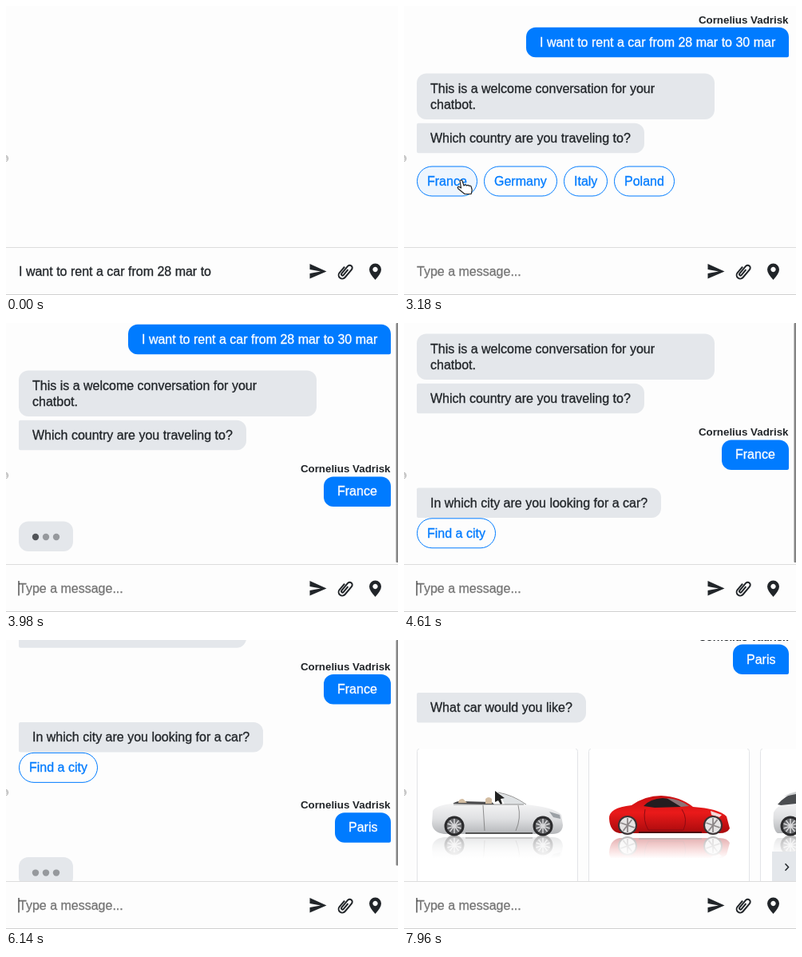
An HTML page that plays this animation: 491x362 px, repeating every 8000 ms.

```html
<!DOCTYPE html>
<html lang="en">
<head>
<meta charset="utf-8">
<title>Car rental chat</title>
<style>
  html, body { margin: 0; width: 100%; height: 100%; overflow: hidden; background: #fdfdfd; }
  svg { display: block; width: 491px; height: 362px; }
  text {
    font: 16px "Liberation Sans", Arial, sans-serif; white-space: pre;
    color: #212529; fill: currentColor; stroke: currentColor; stroke-width: .3px;
  }
  .name { font-weight: bold; font-size: 13.33px; text-anchor: end; stroke: none; }
  .light { color: #fff; }
  .link { color: #007bff; }
  .bot { fill: #e4e7eb; }
  .user { fill: #007bff; }
  .pill { fill: #fdfdfd; stroke: #007bff; }
  .icon { fill: #212529; }
</style>
</head>
<body>
<svg viewBox="0 0 491 362">
  <defs>
    <linearGradient id="fade" x2="0" y2="1">
      <stop offset="0" stop-color="#fff" stop-opacity="0"/>
      <stop offset="1" stop-color="#fff"/>
    </linearGradient>
    <linearGradient id="silver" x2="0" y2="1">
      <stop offset="0" stop-color="#f4f4f5"/>
      <stop offset=".5" stop-color="#dfe0e2"/>
      <stop offset="1" stop-color="#b4b6b9"/>
    </linearGradient>
    <linearGradient id="red" x2="0" y2="1">
      <stop offset="0" stop-color="#c80f12"/>
      <stop offset=".45" stop-color="#ea1a1a"/>
      <stop offset="1" stop-color="#a80a0d"/>
    </linearGradient>
    <g id="wheel">
      <circle r="12.500" fill="#2b2b2d"/>
      <circle r="9.500" fill="#6a6b6e"/>
      <path d="M0-9V9M-8.500-3L8.500 3M-5.500 7L5.500-7M-8.500 3L8.500-3M-5.500-7L5.500 7" stroke="#d8d8da" stroke-width="1.500"/>
    </g>
    <g id="sportWheel">
      <circle r="12" fill="#3a3335"/>
      <circle r="10" fill="#e6e4e4"/>
      <path d="M0-9V9M-8.500-3L8.500 3M-5.500 7L5.500-7" stroke="#8d8788" stroke-width="1.800"/>
    </g>
    <g id="convertible">
      <path d="M60 206q6-5 14-4l36 1 4 4H60z" fill="#4a4a4c"/>
      <path d="M68 204q0-5 6-5l5 5zM102 205v-6q4-4 8 0v6z" fill="#d3bda2"/>
      <path d="M36 214Q40 207 60 205L100 206 150 206Q188 209 197 219L199 232Q198 243 186 243H50Q36 241 35 230Z" fill="url(#silver)"/>
      <path d="M120 192Q136 195 152 206H126Z" fill="#dfe2e4"/>
      <path d="M114 189v14l4-2 3 5 2-1-2-6 5-1z" fill="#222"/>
      <path d="M118 191Q136 194 153 206M62 206H150M99 207l2 32M143 207q4 16-3 32" fill="none" stroke="#777" stroke-width=".8"/>
      <path d="M77 242H161" stroke="#555" stroke-width="2"/>
      <path d="M182 215l13 4 1 5-9-2z" fill="#9ba0a5"/>
      <use href="#wheel" x="63" y="233"/><use href="#wheel" x="174" y="233"/>
    </g>
    <g id="coupe">
      <path d="M257 224Q256 210 285 207 302 195 322 195 346 196 362 209 394 211 404 221L408 236Q405 242 395 242H270Q258 240 257 224Z" fill="url(#red)"/>
      <path d="M300 208Q308 199 324 198 340 199 347 209L314 210Z" fill="#231d20"/>
      <path d="M329 198Q345 199 357 208L347 209Z" fill="#8c7377"/>
      <path d="M302 212q-3 14 4 26h44q6-14-2-26" fill="none" stroke="#8c0a12"/>
      <path d="M294 241H373" stroke="#4a080b" stroke-width="2"/>
      <path d="M384 214l14 5-3 3-10-3z" fill="#f3d9d9"/>
      <use href="#sportWheel" x="280" y="232"/><use href="#sportWheel" x="387" y="232"/>
    </g>
    <g id="wagon">
      <path d="M463 216Q467 207 480 205L491 203V242H468Q461 238 463 216Z" fill="url(#silver)"/>
      <path d="M468 206Q478 194 491 191V205L472 207Z" fill="#4b4d50"/>
      <path d="M476 196Q482 192 491 190V193Z" fill="#cfd1d3"/>
      <use href="#wheel" x="484" y="233"/>
    </g>
  </defs>
  <rect width="491" height="362" fill="#fdfdfd"/>
  <g id="chat"></g>
  <g fill="none" stroke="#aaa" stroke-width=".9"><circle cx="-1.3" cy="191" r="4"/><path d="M-1 189h2v4"/></g>
  <rect id="thumb" x="488.5" width="3" rx="1" fill="#858585"/>
  <g id="pointer" stroke-linejoin="round">
    <path id="arrow" d="M0 0V15l3.5-3 2.5 6 2.5-1-2.5-6H11z" fill="#111" stroke="#fff"/>
    <path id="hand" d="M0 2q1.5-2 3 0l2 6q2-2 3.5 0 2-1.5 3 .5 2-1 2.7 1l1 4-1 5H6L-2 12q-2-3 1-2.5l2.5 1.5z" fill="#fff" stroke="#222" stroke-width="1.2"/>
  </g>
  <g id="footer">
    <rect y="302" width="491" height="60" fill="#fdfdfd"/>
    <path d="M0 302.5H491" stroke="#dcdcdc"/>
    <path d="M0 361.5H491" stroke="#d0d0d0"/>
    <text id="input" x="16" y="337.5"></text>
    <rect id="caret" x="15.5" y="323" width="1" height="18.5" fill="#000"/>
    <path class="icon" d="M380.5 323L401.5 332.5 380.5 341.5V335L394 332.5 380.5 330Z"/>
    <path d="M-4.5-4V6a4.5 4.5 0 0 0 9 0V-7a3.2 3.2 0 0 0-6.4 0V5a1.5 1.5 0 0 0 3 0V-4" transform="translate(425 332.5) rotate(40)" fill="none" stroke="#212529" stroke-width="2"/>
    <path class="icon" fill-rule="evenodd" d="M462.5 322.5a7.5 7.5 0 0 1 7.5 7.5q0 5-7.5 13-7.5-8-7.5-13a7.5 7.5 0 0 1 7.5-7.5zm0 4.3a3.2 3.2 0 1 0 .01 0z"/>
  </g>
</svg>
<script>
const LOOP = 8000, END = Infinity, SENDER = "Cornelius Vadrisk";
const BUBBLE_H = 37.5;
const $ = id => document.getElementById(id);
const chat = $("chat");
const timed = [];    // { node, from, to }
const typing = [];   // { dots, from }

function add(parent, tag, attrs, content) {
  const node = document.createElementNS("http://www.w3.org/2000/svg", tag);
  for (const key in attrs) node.setAttribute(key, attrs[key]);
  if (content) node.textContent = content;
  return parent.appendChild(node);
}

function group(from, to = END) {
  const node = add(chat, "g", {});
  timed.push({ node, from, to });
  return node;
}

function bubble(parent, cls, x, y, w, h, [tl, tr, br, bl]) {
  add(parent, "path", { class: cls, d: `M${x + tl} ${y}h${w - tl - tr}a${tr} ${tr} 0 0 1 ${tr} ${tr}v${h - tr - br}` +
    `a${br} ${br} 0 0 1 ${-br} ${br}h${-(w - br - bl)}a${bl} ${bl} 0 0 1 ${-bl} ${-bl}v${-(h - tl - bl)}a${tl} ${tl} 0 0 1 ${tl} ${-tl}z` });
}

function userMessage(from, y, x, text) {
  const g = group(from);
  add(g, "text", { class: "name", x: 481.5, y: y - 5 }, SENDER);
  bubble(g, "user", x, y, 482 - x, BUBBLE_H, [12, 12, 2, 12]);
  add(g, "text", { class: "light", x: x + 17, y: y + 24 }, text);
}

function botMessage(from, y, w, lines, radii = [2, 12, 12, 2]) {
  const g = group(from);
  bubble(g, "bot", 16, y, w, BUBBLE_H + 20 * (lines.length - 1), radii);
  lines.forEach((line, i) => add(g, "text", { x: 33, y: y + 24 + 20 * i }, line));
}

function pill(parent, x, y, w, text) {
  const shape = add(parent, "rect", { class: "pill", x: x + .5, y, width: w - 1, height: 37, rx: 18.5 });
  add(parent, "text", { class: "link", x: x + 13, y: y + 24 }, text);
  return shape;
}

function typingBubble(from, to, y) {
  const g = group(from, to);
  bubble(g, "bot", 16, y, 68, BUBBLE_H, [12, 12, 12, 12]);
  const dots = [37, 50, 63].map(cx => add(g, "circle", { class: "icon", cx, cy: y + 19.5, r: 4.2 }));
  typing.push({ dots, from });
}

userMessage(1600, 26.7, 153, "I want to rent a car from 28 mar to 30 mar");
typingBubble(2020, 2540, 83);
botMessage(2540, 84.5, 373, ["This is a welcome conversation for your", "chatbot."], [12, 12, 12, 12]);
botMessage(2540, 146.7, 285, ["Which country are you traveling to?"]);

const countries = group(2540, 3530);
const ring = add(countries, "rect", { x: 13, y: 198, width: 82, height: 43, rx: 21.5, fill: "#bfdeff" });
const france = pill(countries, 16, 201, 76, "France");
pill(countries, 100, 201, 92, "Germany");
pill(countries, 200, 201, 55, "Italy");
pill(countries, 263, 201, 76, "Poland");

userMessage(3530, 217.4, 398, "France");
typingBubble(3630, 4260, 273.5);
botMessage(4260, 277.5, 306, ["In which city are you looking for a car?"]);
pill(group(4260), 16, 315.8, 99, "Find a city");
userMessage(6020, 390.6, 412, "Paris");
typingBubble(6100, 7420, 446.5);
botMessage(7420, 451, 212, ["What car would you like?"]);

const cards = group(7420);
const gallery = add(cards, "g", { transform: "translate(0 385)" });
["convertible", "coupe", "wagon"].forEach((car, i) => {
  const x = 16 + 215 * i;
  add(gallery, "path", { d: `M${x + 3} 136.5q-2.5 0-2.5 3v240h201v-240q0-3-2.5-3`, fill: "#fff", stroke: "#e2e4e7" });
  add(gallery, "use", { href: "#" + car, transform: "translate(0 490) scale(1 -1)", opacity: .35 });
  add(gallery, "rect", { x: x + 1, y: 245, width: 200, height: 29, fill: "url(#fade)" });
  add(gallery, "rect", { x: x + 1, y: 273, width: 200, height: 30, fill: "#fff" });
  add(gallery, "use", { href: "#" + car });
});
add(gallery, "rect", { class: "bot", x: 461, y: 265, width: 30, height: 60 });
add(gallery, "path", { d: "M477.5 280.3l4 4.2-4 4.2", fill: "none", stroke: "#212529", "stroke-width": 1.5 });

const scrolls = [
  { from: 3630, to: 3870, a: 0, b: 25, hide: 4370 },
  { from: 4370, to: 4610, a: 25, b: 71, hide: 4910 },
  { from: 6020, to: 6260, a: 71, b: 198, hide: 6560 },
  { from: 7420, to: 7620, a: 198, b: 385, hide: 7900 },
];
const typed = [
  [0, "I want to rent a car from 28 mar to"], [410, "I want to rent a car from 28 mar to 3"],
  [470, "I want to rent a car from 28 mar to 30"], [770, "I want to rent a car from 28 mar to 30 m"],
  [1070, "I want to rent a car from 28 mar to 30 mar"], [1600, ""],
  [5140, "P"], [5430, "Pa"], [5490, "Par"], [5730, "Pari"], [5790, "Paris"], [6020, ""],
];
const caretOn = [[1600, 2100], [2540, 3040], [3530, 4910], [6020, 6520], [7020, 8000]];

const progress = (t, a, b) => Math.min(1, Math.max(0, (t - a) / (b - a)));
const show = (node, on) => node.setAttribute("visibility", on ? "inherit" : "hidden");

function render(t) {
  for (const { node, from, to } of timed) show(node, t >= from && t < to);

  for (const { dots, from } of typing) dots.forEach((dot, i) => {
    const phase = Math.max(0, (t - from - 70) / 1000 - i / 3);
    dot.setAttribute("opacity", .4 + .3 * (1 - Math.cos(2 * Math.PI * phase)));
  });

  const scroll = scrolls.findLast(s => t >= s.from);
  const top = scroll ? scroll.a + (scroll.b - scroll.a) * (1 - (1 - progress(t, scroll.from, scroll.to)) ** 2.4) : 0;
  chat.setAttribute("transform", `translate(0 ${-top})`);
  show($("thumb"), scroll && t < scroll.hide + 60);
  if (scroll) {
    $("thumb").setAttribute("height", 300 - .74 * (scroll.b - top));
    $("thumb").setAttribute("opacity", 1 - progress(t, scroll.hide - 60, scroll.hide + 60));
  }

  const value = typed.findLast(([at]) => t >= at)[1];
  $("input").textContent = value || "Type a message...";
  $("input").style.color = value ? "#212529" : "#757575";
  show($("caret"), caretOn.some(([a, b]) => t >= a && t < b));

  const move = 1 - (1 - progress(t, 2720, 3120)) ** 2;
  const x = 105 - 35 * move, y = 182 + 35 * move;
  const hover = t >= 2720 && x < 90 && y > 201;
  $("pointer").setAttribute("transform", `translate(${x} ${y})`);
  show($("pointer"), t >= 2720 && t < 3530);
  show($("arrow"), !hover);
  show($("hand"), hover);
  france.style.fill = hover ? "#edf5fe" : "#fdfdfd";
  show(ring, t >= 3410 && t < 3530);
}

function tick(now) {
  render(now % LOOP);
  requestAnimationFrame(tick);
}
render(0);
requestAnimationFrame(tick);
</script>
</body>
</html>
```
